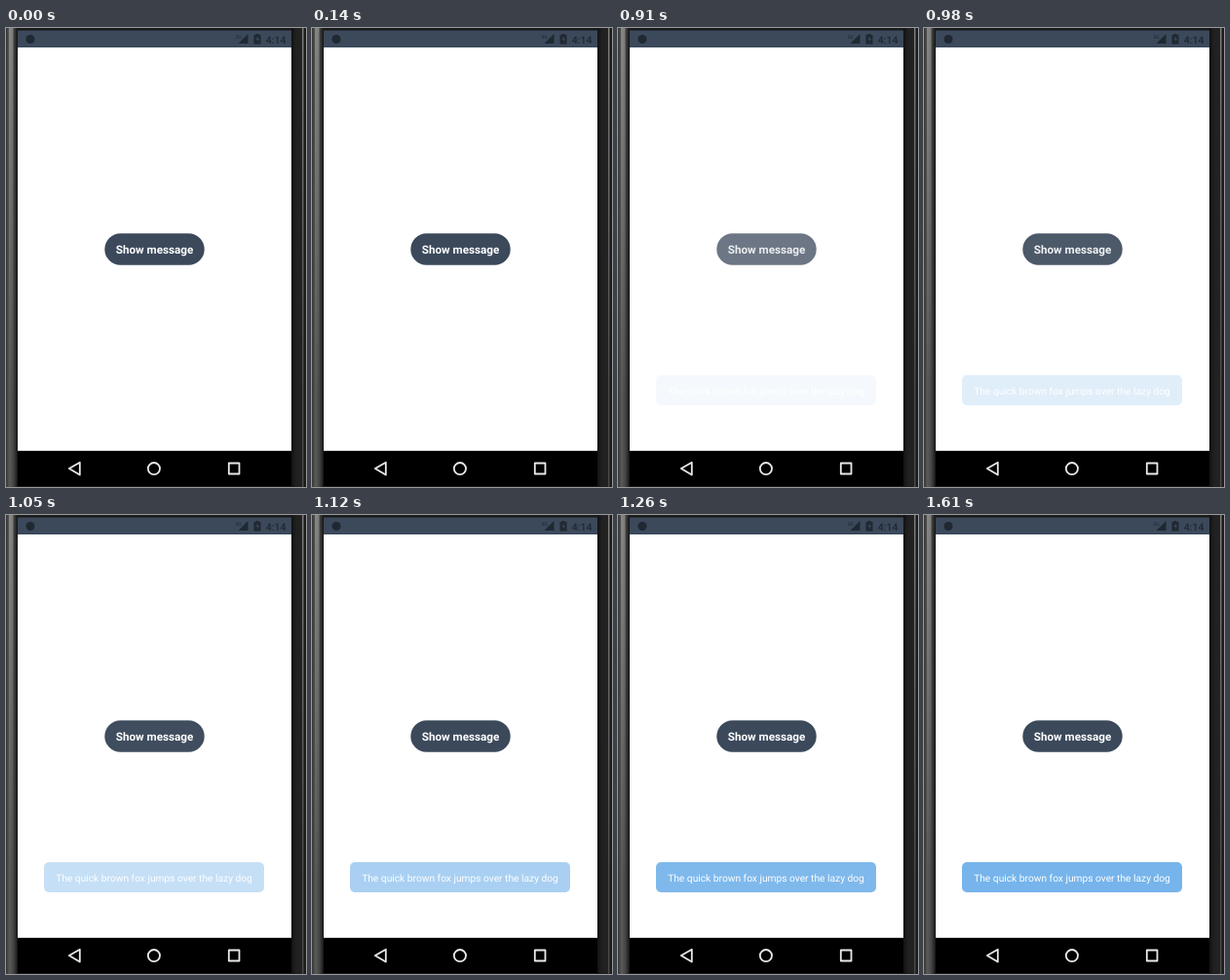
An HTML page that plays this animation: 308x472 px, repeating every 2310 ms.

```html
<!DOCTYPE html>
<html lang="en">
<head>
<meta charset="utf-8">
<title>Show message</title>
<style>
  html, body { margin: 0; width: 100%; height: 100%; overflow: hidden; background: #111; }
  svg { display: block; width: 308px; height: 472px; }
  text { font-family: Roboto, "Liberation Sans", sans-serif; text-anchor: middle; text-rendering: geometricPrecision; }

  .slate { fill: #3b495b; }
  .status { fill: #202832; }
  .clock { font-size: 10.5px; font-weight: 500; }
  .nav { fill: none; stroke: #e9e9e9; stroke-width: 1.8; stroke-linejoin: round; }
  .label { font-size: 11.7px; font-weight: 700; fill: #fff; }
  .message { font-size: 10.22px; fill: #fff; }

  .button, .label, .toast { animation: 2310ms step-end infinite; }
  .button { animation-name: press; }
  .label { animation-name: tint; }
  .toast { animation-name: appear; }

  /* One step is 70 ms, 1/33 of the loop */
  @keyframes press {
    0% { opacity: 1; }
    30.3% { opacity: .65; }
    39.39% { opacity: .75; }
    42.42% { opacity: .91; }
    45.45% { opacity: .98; }
    48.48%, 100% { opacity: 1; }
  }
  @keyframes tint {
    0% { fill: #fff; }
    30.3% { fill: #dfe1e5; }
    39.39% { fill: #e6e8eb; }
    42.42% { fill: #f0f1f3; }
    45.45%, 100% { fill: #fff; }
  }
  @keyframes appear {
    0% { opacity: 0; }
    39.39% { opacity: .07; }
    42.42% { opacity: .22; }
    45.45% { opacity: .42; }
    48.48% { opacity: .62; }
    51.51% { opacity: .8; }
    54.54% { opacity: .93; }
    57.57% { opacity: .98; }
    60.6%, 100% { opacity: 1; }
  }
</style>
</head>
<body>
<svg viewBox="0 0 308 472">
  <defs>
    <linearGradient id="left">
      <stop offset="0" stop-color="#343433"/>
      <stop offset=".3" stop-color="#5a5a58"/>
      <stop offset=".6" stop-color="#484847"/>
      <stop offset=".85" stop-color="#2a2a2a"/>
      <stop offset="1" stop-color="#121212"/>
    </linearGradient>
    <linearGradient id="right">
      <stop offset="0" stop-color="#121212"/>
      <stop offset=".3" stop-color="#202020"/>
      <stop offset=".7" stop-color="#222"/>
      <stop offset="1" stop-color="#181818"/>
    </linearGradient>
    <linearGradient id="shine" x2="0" y2="1">
      <stop offset="0" stop-color="#fff" stop-opacity=".28"/>
      <stop offset=".3" stop-color="#fff" stop-opacity=".18"/>
      <stop offset=".8" stop-color="#fff" stop-opacity="0"/>
    </linearGradient>
  </defs>

  <!-- Phone body and screen -->
  <rect width="308" height="472" fill="#1a1a1a"/>
  <rect width="12" height="472" fill="url(#left)"/>
  <rect x="3" width="4.500" height="472" fill="url(#shine)"/>
  <rect x="293" width="15" height="472" fill="url(#right)"/>
  <rect x="304" width="1.500" height="472" fill="#484847"/>
  <rect x="304" width="1.500" height="472" fill="url(#shine)"/>
  <rect x="12" y="20" width="281" height="415" fill="#fff"/>
  <rect x="12" y="434.800" width="281" height="36.200" fill="#000"/>

  <!-- Status bar -->
  <rect class="slate" x="12" y="2.500" width="281" height="17.500"/>
  <g class="status">
    <circle cx="25" cy="11.500" r="4.500"/>
    <path d="M238.500 16H248.500V6Z"/>
    <text x="238.500" y="10.500" font-size="5">3G</text>
    <path d="M256.500 6h3v1h2v9.500h-7V7h2z"/>
    <path class="slate" d="M258.500 8.500l-2 3.500h1.500v2.500l2-3.500h-1.500z"/>
    <text class="clock" x="277" y="15.500">4:14</text>
  </g>

  <!-- Navigation -->
  <g class="nav">
    <path d="M64.800 453l11-6.300v12.800z"/>
    <circle cx="151.900" cy="453.100" r="6.100"/>
    <rect x="228.800" y="447.500" width="10.700" height="11"/>
  </g>

  <g class="button">
    <rect class="slate" x="101.300" y="211.300" width="102.400" height="32.400" rx="16.200"/>
    <text class="label" x="152.500" y="232.300">Show message</text>
  </g>

  <g class="toast">
    <rect x="39" y="357" width="226" height="31" rx="5" fill="#76b4eb"/>
    <text class="message" x="152" y="376.700">The quick brown fox jumps over the lazy dog</text>
  </g>
</svg>
</body>
</html>
```
